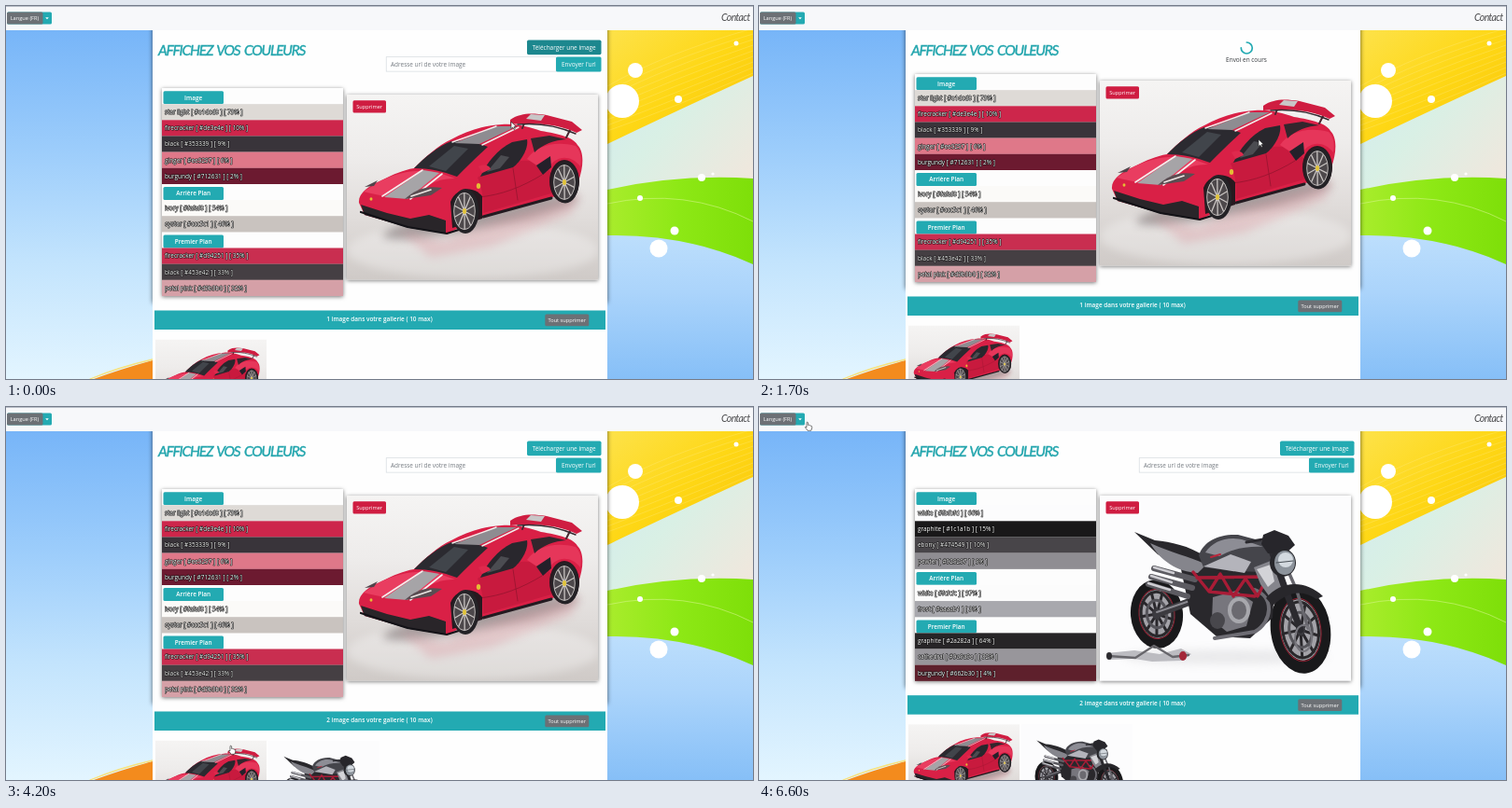
Write an HTML page that moves like this. It is 800x400 px and loops after 6700 ms.

```html
<!DOCTYPE html>
<html lang="fr">
<head>
<meta charset="utf-8">
<style>
html, body { margin: 0; width: 100%; height: 100%; overflow: hidden; background: #fff; }
svg { display: block; width: 800px; height: 400px; font: 6.45px "Open Sans", "Noto Sans", sans-serif; }
.white { fill: #fff; }
.small { font-size: 5.65px; }
.bold { font-weight: 600; }
.mid { text-anchor: middle; }
.outlined { fill: #fff; stroke: #111; stroke-width: 1px; paint-order: stroke; stroke-linejoin: round; }
.brush { font: italic 400 15.5px Lato, sans-serif; letter-spacing: -1.2px; word-spacing: 2px; fill: #22a5ad; stroke: #22a5ad; stroke-width: .4px; }
.script { font: italic 400 10.5px Lato, sans-serif; letter-spacing: -.6px; fill: #4b4b4d; }
.shadow { filter: drop-shadow(0 1.5px 2px #0008); }
.edge { filter: drop-shadow(0 0 2.5px #0009); }
</style>
</head>
<body>
<svg id="stage" viewBox="0 0 800 400"></svg>
<script>
const TEAL = '#23aab2', LOOP = 6700;
const UPLOAD = 1200, READY = 2150, PICK_CAR = 3850, PICK_BIKE = 5400;
const ROW = 17.15;

const rect = (x, y, w, h, fill, extra = '') =>
  `<rect x="${x}" y="${y}" width="${w}" height="${h}" fill="${fill}" ${extra}/>`;
const text = (x, y, s, cls = '', extra = '') => `<text x="${x}" y="${y}" class="${cls}" ${extra}>${s}</text>`;
const path = (d, fill, extra = '') => `<path d="${d}" fill="${fill}" ${extra}/>`;
const line = (d, stroke, w, extra = '') =>
  `<path d="${d}" fill="none" stroke="${stroke}" stroke-width="${w}" stroke-linecap="round" stroke-linejoin="round" ${extra}/>`;
const oval = (x, y, rx, ry, fill, extra = '') =>
  `<ellipse cx="${x}" cy="${y}" rx="${rx}" ry="${ry}" fill="${fill}" ${extra}/>`;
const gradient = (id, dir, ...stops) => `<linearGradient id="${id}" ${dir}>` +
  stops.map((c, i) => `<stop offset="${i / (stops.length - 1)}" stop-color="${c}"/>`).join('') + '</linearGradient>';
const DOWN = 'x1="0" y1="0" x2="0" y2="1"', DIAGONAL = 'x1="0" y1="0" x2="1" y2="1"', ACROSS = 'x1="0" y1="0" x2="1" y2="0"';

function spokes(cx, cy, rx, ry, n, color, w) {
  let d = '';
  for (let i = 0; i < n; i++) {
    const a = i / n * 2 * Math.PI + .3;
    d += `M${cx} ${cy}L${(cx + rx * Math.cos(a)).toFixed(1)} ${(cy + ry * Math.sin(a)).toFixed(1)}`;
  }
  return line(d, color, w);
}

// Palettes: a one-item entry is a section heading.
const palettes = {
  car: [['Image'], ['star light [ #e1dcd8 ] [ 73% ]', '#dedad6'], ['firecracker [ #de3e4e ] [ 10% ]', '#cd264b'],
    ['black [ #353339 ] [ 9% ]', '#39343a'], ['ginger [ #ee9297 ] [ 6% ]', '#df7889'],
    ['burgundy [ #712631 ] [ 2% ]', '#6c1a30'], ['Arrière Plan'], ['ivory [ #fafaf8 ] [ 54% ]', '#fbfaf8'],
    ['oyster [ #ccc5c1 ] [ 46% ]', '#c9c3bf'], ['Premier Plan'], ['firecracker [ #d94251 ] [ 35% ]', '#c92e50'],
    ['black [ #453e42 ] [ 33% ]', '#453f43'], ['petal pink [ #d9b3b0 ] [ 32% ]', '#d5a0a7']],
  bike: [['Image'], ['white [ #fbfbfd ] [ 66% ]', '#fcfcfd'], ['graphite [ #1c1a1b ] [ 15% ]', '#191819'],
    ['ebony [ #474549 ] [ 10% ]', '#484549'], ['pewter [ #929297 ] [ 9% ]', '#8f8d92'],
    ['Arrière Plan'], ['white [ #fcfcfc ] [ 97% ]', '#fcfcfc'], ['frost [ #aaaab1 ] [ 3% ]', '#a8a8ad'],
    ['Premier Plan'], ['graphite [ #2a282a ] [ 64% ]', '#272527'], ['cathedral [ #9a9a9e ] [ 32% ]', '#98969b'],
    ['burgundy [ #662b30 ] [ 4% ]', '#5e202c']]
};

function card(name) {
  const rows = palettes[name];
  return `<g id="card-${name}">` + rect(167, 88, 194, rows.length * ROW, '#fdfdfd', 'class="shadow"') +
    rows.map(([label, color], i) => {
      const y = 88 + i * ROW;
      return color
        ? rect(167, y, 194, ROW + .1, color) + text(170, y + 10.9, label, 'outlined')
        : rect(168.5, y + 3.2, 64.5, 13.9, TEAL, 'rx="1.5"') + text(200.7, y + 12.5, label, 'white mid bold');
    }).join('') + '</g>';
}

const carWheel = (x, y, rx, ry) => oval(x, y, rx, ry, '#242226') + oval(x - 1, y, rx * .8, ry * .84, '#4d484b') +
  spokes(x - 1, y, rx * .76, ry * .8, 10, '#c9c4c2', 1.3) +
  oval(x - 1, y, rx * .78, ry * .82, 'none', 'stroke="#b9b4b3" stroke-width="1"') + oval(x - 1, y, 2, 3, '#e2c43c');

const car = `<symbol id="car" viewBox="365 95 269 198.5" preserveAspectRatio="none">` +
  rect(365, 95, 269, 199, 'url(#studio)') +
  oval(500, 262, 135, 30, '#fff', 'opacity=".3" filter="url(#soft)"') +
  oval(508, 226, 106, 13, '#776d6e', 'opacity=".55" filter="url(#soft)" transform="rotate(-11 508 226)"') +
  path('M420 240L470 252L520 230L615 202L606 222L520 258L455 270Z', '#d98a94', 'opacity=".3" filter="url(#soft)"') +
  // body and shading
  path('M378 211C377 201 388 193 402 187C416 180 425 176 437 174C449 162 462 150 477 143C493 134 512 128 531 127C548 126 560 130 573 134C592 137 608 141 612 149C619 156 619 171 613 188L584 206L511 226L472 244L430 237L384 224Z', '#d92046') +
  path('M402 187C422 178 441 174 464 179L481 185C463 184 447 193 433 206C415 206 398 203 383 199Z', '#e93d60') +
  path('M505 184C516 174 530 169 552 166C566 165 574 169 584 179L584 201L511 222C511 204 510 195 505 184Z', '#c81a3e') +
  path('M558 164C567 150 588 144 610 150C615 155 617 163 615 172C604 158 586 160 579 178Z', '#e6365a') +
  // wing
  line('M553 131L556 123M600 141L605 131', '#4a2630', 2) +
  path('M540 122C552 114 564 115 579 117L606 124L617 133L611 136C594 127 566 124 540 127Z', '#cf1d41') +
  line('M548 127C570 125 592 129 610 137', '#34282f', 1.5) +
  path('M557 121L562 116L577 117L573 123Z', '#c9c6c7') +
  // glass
  path('M437 174C449 162 463 150 477 145C491 143 505 147 516 151C504 162 493 173 483 183C467 177 453 174 437 174Z', '#2b2a30') +
  path('M453 172L480 150L495 153L471 177Z', '#596066', 'opacity=".5"') +
  path('M508 183C515 168 526 154 542 146L558 143C560 153 551 167 543 173Z', '#29272d') +
  path('M515 178L530 160L539 162L529 174Z', '#63646a', 'opacity=".6"') +
  path('M562 142L582 139L600 143C587 144 575 148 566 157Z', '#33262d') +
  path('M568 171L583 161L584 173L575 181Z', '#24202a') +
  // stripes
  path('M405 205L447 176L464 179L430 207Z', '#a6a4a7') +
  line('M403 204L446 176M433 207L467 180', '#f3efed', 1.6) +
  path('M480 147L525 129L547 129L507 148Z', '#8e8c91') +
  line('M478 146L525 129M510 149L549 130', '#f0ecea', 1.4) +
  // front
  path('M427 207C438 197 449 192 467 195L455 203Z', '#5a4d52') + line('M434 204L455 197', '#ece5e2', 1.7) +
  path('M384 194L398 187L394 193Z', '#51434a') +
  path('M380 213L408 222L433 228L453 224L471 230L471 244L432 238L384 224Z', '#292529') +
  line('M380 221L430 237L472 244L488 239', '#131217', 2.2) +
  line('M511 226L584 206', '#231a20', 3) +
  line('M506 205C530 203 553 194 574 181M543 174L548 208', '#95152f', .8) +
  path('M476 210C482 195 500 192 510 204L510 228L478 238Z', '#27191f') +
  oval(598, 188, 16, 23, '#2b1a21') +
  carWheel(492, 220, 14.5, 24) + carWheel(599, 189, 14.5, 22.5) +
  path('M506 172C512 169 518 171 519 175L510 179Z', '#df294d') +
  oval(506, 193, 2.2, 3, '#e4bd34') + oval(391, 207, 1.5, 1.8, '#e4bd34') +
  '</symbol>';

const bikeWheel = (x, y, rx, ry, tilt) => `<g transform="rotate(${tilt} ${x} ${y})">` +
  oval(x, y, rx, ry, '#19191b') + oval(x, y, rx * .66, ry * .7, '#a3a2a8') +
  oval(x, y, rx * .68, ry * .72, 'none', 'stroke="#8f1f30" stroke-width="1"') +
  oval(x, y, rx * .6, ry * .64, 'none', 'stroke="#29282b" stroke-width="3"') +
  spokes(x, y, rx * .6, ry * .64, 9, '#29272b', 3) +
  oval(x, y, rx * .38, ry * .4, 'none', 'stroke="#55545a" stroke-width="3"') + oval(x, y, 5, 6, '#3a393e') + '</g>';

const bike = `<symbol id="bike" viewBox="365 95 269 198.5" preserveAspectRatio="none">` +
  rect(365, 95, 269, 199, '#fcfcfd') +
  oval(500, 268, 110, 8, '#c9c9cc', 'opacity=".35" filter="url(#soft)"') +
  bikeWheel(426, 222, 28, 37, -5) + bikeWheel(580, 239, 32, 47, -8) +
  // stand
  path('M372 264L402 261L429 265L452 259L463 265L453 272L421 273L402 270L376 271Z', '#bcbcc1') +
  line('M374 267L403 269L423 256L443 268L460 266', '#68676c', 2.3) +
  oval(375, 267, 3, 4, '#2c2b2f') + oval(454, 267, 4, 5, '#a32739') +
  // engine
  line('M426 222L466 207L486 225', '#3c3b40', 8) + line('M426 220L470 205', '#8a8990', 2) +
  path('M452 174L511 168L553 178L550 226L526 248L490 246L462 222Z', '#29282c') +
  path('M486 204L511 197L529 209L522 235L501 241L485 228Z', '#77767d') +
  oval(514, 218, 12, 14, '#a8a8ad') + oval(514, 218, 8, 10, '#6b6a70') + oval(491, 229, 8, 9, '#48474c') +
  line('M531 196C552 204 550 230 531 241L488 248', '#6d6c73', 4) +
  // tail and exhausts
  path('M402 134L424 143C442 145 459 148 479 161L479 173L451 172L427 158Z', '#29282c') +
  path('M419 146C443 157 458 159 479 169L470 178C448 177 430 165 419 146Z', '#85858c') +
  line('M423 173L467 185M420 182L464 194M417 190L459 203', '#5c5b61', 6) +
  line('M423 172L444 178M420 181L442 188M417 189L440 196', '#cecdd2', 2.4) +
  // frame and tank
  line('M465 177L482 198L494 179L508 203L521 184L534 203L544 183M469 183L542 182M482 198L531 203', '#a81c36', 3.3) +
  path('M471 159C476 144 492 136 513 137L543 145L555 162L540 177L511 176L476 172Z', '#45454b') +
  path('M478 156C487 143 503 138 520 143L540 150C523 149 507 152 493 160Z', '#8d8d95') +
  path('M476 171L505 158L527 166L520 178Z', '#b4b4bb') + line('M484 161L494 158', '#ba263b', 2) +
  path('M530 172L553 163L562 194L550 208L537 190Z', '#85858c') + path('M533 174L548 169L552 187L545 193Z', '#d3d3d7') +
  // fork and front end
  line('M548 151L562 191L580 239', '#2b2a2f', 7) + line('M562 165L576 197L588 237', '#68676e', 3.5) +
  path('M543 205C558 187 584 184 604 203L597 206C582 195 566 198 550 213Z', '#28272b') +
  line('M522 145L540 142L551 137', '#2a292e', 3) +
  path('M540 137L552 132L567 138L574 148L564 157L545 157L538 147Z', '#27262b') +
  oval(561, 167, 14, 15, '#27272b') + oval(563, 167, 11, 13, '#8c939b') + oval(564, 164, 8, 8, '#d3d9df') +
  line('M554 167L572 165', '#4a5157', 1.2) +
  oval(583, 248, 9, 14, 'none', 'stroke="#77767d" stroke-width="2"') +
  '</symbol>';

const dots = [[660, 102, 18], [674, 69, 8], [720, 100, 4], [782, 40, 2.5], [679, 206, 3], [745, 184, 4],
  [757, 180, 1.6], [699, 260, 9.5], [716, 241, 4.5]];
const threads = Array.from({ length: 9 }, (_, i) =>
  line(`M644 ${134 - i * 6}Q${718 - i * 2} ${108 - i * 7} 800 ${72 - i * 6}`, '#fff0a0', .5, 'opacity=".5"')).join('');

const backdrop = rect(0, 26, 157, 374, 'url(#leftSky)') +
  path('M94 400Q124 389 157 380V400Z', '#f38b1d') + line('M90 400Q122 387 157 379', '#f8e27a', 1.3) +
  rect(644, 26, 156, 374, 'url(#rightSky)') +
  path('M644 26H800V200H644Z', 'url(#mint)') +
  path('M644 26H800V75Q715 114 644 148Z', 'url(#sun)') + threads +
  path('M644 197Q720 180 800 185V277Q728 244 644 246Z', 'url(#grass)') +
  line('M644 212Q728 194 800 231', '#d6f58a', .6) +
  dots.map(([x, y, r]) => oval(x, y, r, r, '#fff')).join('');

const header = rect(0, 0, 800, 26, '#f7f8fa') + rect(0, 0, 800, 1, '#b9bfc8') +
  rect(1, 6.5, 48, 13, TEAL, 'rx="1.5"') + rect(1, 6.5, 38.5, 13, '#6c7075', 'rx="1.5"') +
  text(4.7, 15.2, 'Langue (FR)', 'white small') + path('M42.2 12.2h3.6l-1.8 2z', '#fff') +
  text(766, 16, 'Contact', 'script');

const form = '<g id="form">' + rect(558, 36.5, 79.5, 15.7, TEAL, 'rx="1.7" id="upload"') +
  text(597.7, 46.8, 'Télécharger une image', 'white mid') +
  rect(407.2, 54.7, 182, 15.4, '#fff', 'stroke="#ced4da" stroke-width=".6"') +
  text(412, 64.9, 'Adresse url de votre image', '', 'fill="#747a80"') +
  rect(589, 54.4, 48.5, 16, TEAL, 'rx="1.5"') + text(613.3, 64.9, "Envoyer l'url", 'white mid') + '</g>';

const loading = '<g id="loading">' +
  line('M518.05 49.25A6 6 0 1 0 518.05 40.75', TEAL, 1.7, 'id="spinner"') +
  text(522, 60.3, 'Envoi en cours', 'mid', 'fill="#34383c"') + '</g>';

const stage = document.getElementById('stage');
stage.innerHTML = '<defs>' +
  gradient('leftSky', DOWN, '#77b5f8', '#9bccfb', '#c3e4fd', '#e3f5ff') +
  gradient('rightSky', DOWN, '#e7f5f8', '#c4e3fb', '#c6e4fd', '#abd4fb', '#86bff7') +
  gradient('mint', DIAGONAL, '#cfeaf2', '#d9f0e5', '#f3e6dc') +
  gradient('sun', DIAGONAL, '#fde24a', '#fed715', '#f9c40c') +
  gradient('grass', ACROSS, '#a9ec2c', '#8de815', '#7edf09') +
  gradient('studio', DOWN, '#f5f4f3', '#eeeceb', '#e0dcda', '#cfcac7') +
  '<filter id="soft" x="-30%" y="-60%" width="160%" height="220%"><feGaussianBlur stdDeviation="5"/></filter>' +
  car + bike + '</defs>' + backdrop +
  rect(157, 20, 487, 298, '#fefefe', 'id="panel" class="edge"') + rect(157, 26, 487, 374, '#fefefe') + header +
  text(163, 52.5, 'AFFICHEZ VOS COULEURS', 'brush') + form + loading +
  '<g id="content">' + card('car') + card('bike') +
  rect(365, 95, 269, 198.5, '#fff', 'class="shadow"') +
  '<use id="photo" x="365" y="95" width="269" height="198.5"/>' +
  rect(371.5, 101.3, 35.5, 13.2, '#cf1d41', 'rx="1.5"') + text(389.2, 110, 'Supprimer', 'white small mid') + '</g>' +
  '<g id="gallery">' + rect(159, 0, 483, 20.5, TEAL) + text(400, 11.2, '', 'white mid bold', 'id="count"') +
  rect(577.3, 4, 47, 12.8, '#6c7075', 'rx="1.5"') + text(600.8, 12.5, 'Tout supprimer', 'white small mid') +
  '<use href="#car" x="160" y="31" width="119" height="87.8"/>' +
  '<use href="#bike" id="second" x="281" y="31" width="119" height="87.8"/></g>' +
  '<g id="cursor" stroke="#222" stroke-width=".6" fill="#fff" stroke-linejoin="round">' +
  '<path id="arrow" d="M0 0V7.5L1.8 6L3 8.6L4.2 8L3 5.5H5.3Z"/>' +
  '<path id="hand" d="M1 .6Q2 -.4 2.6 .8V3.5Q3.5 3 4.1 3.8Q5 3.4 5.5 4.2Q6.7 4 6.7 5.3V7L5.7 9.3H2.1L-.6 5.7Q-.2 4.7 1 5.8Z"/></g>';

const el = id => document.getElementById(id);
const show = (id, on) => el(id).setAttribute('display', on ? 'inline' : 'none');
const place = (id, x, y) => el(id).setAttribute('transform', `translate(${x} ${y})`);

// Pointer stops: time, x, y.
const stops = [[0, 541, 124], [500, 533, 143], [1500, 533, 143], [1700, 535, 143], [2600, 535, 143],
  [3500, 239, 363], [4200, 239, 363], [4800, 338, 380], [5600, 338, 380], [6500, 50, 16], [LOOP, 50, 16]];

function pointer(t) {
  const i = Math.max(1, stops.findIndex(s => s[0] > t));
  const [t0, x0, y0] = stops[i - 1], [t1, x1, y1] = stops[i];
  const p = (t - t0) / (t1 - t0), k = p * p * (3 - 2 * p);
  return [x0 + (x1 - x0) * k, y0 + (y1 - y0) * k];
}

function draw(t) {
  const busy = t >= UPLOAD && t < READY;
  const onBike = t >= READY && t < PICK_CAR || t >= PICK_BIKE;
  const kind = onBike ? 'bike' : 'car', total = t < READY ? 1 : 2;
  const shift = busy ? -15 : 0, barY = (onBike ? 309.2 : 326.5) + shift;

  show('form', !busy);
  show('loading', busy);
  show('card-car', !onBike);
  show('card-bike', onBike);
  show('second', total === 2);
  el('upload').setAttribute('fill', t < UPLOAD ? '#1c878e' : TEAL);
  el('photo').setAttribute('href', '#' + kind);
  el('count').textContent = `${total} image dans votre gallerie ( 10 max)`;
  el('panel').setAttribute('height', barY - 28);
  el('spinner').setAttribute('transform', `rotate(${(t - 1700) / 750 * 360 + 45} 522.3 45)`);
  place('content', 0, shift);
  place('gallery', 0, barY);

  const [x, y] = pointer(t);
  const overLink = y > barY + 31 && x < 400 || y < 20 && x < 52;
  place('cursor', x, y);
  show('arrow', !overLink);
  show('hand', overLink);
}

function tick() {
  draw(performance.now() % LOOP);
  requestAnimationFrame(tick);
}
tick();
</script>
</body>
</html>
```
